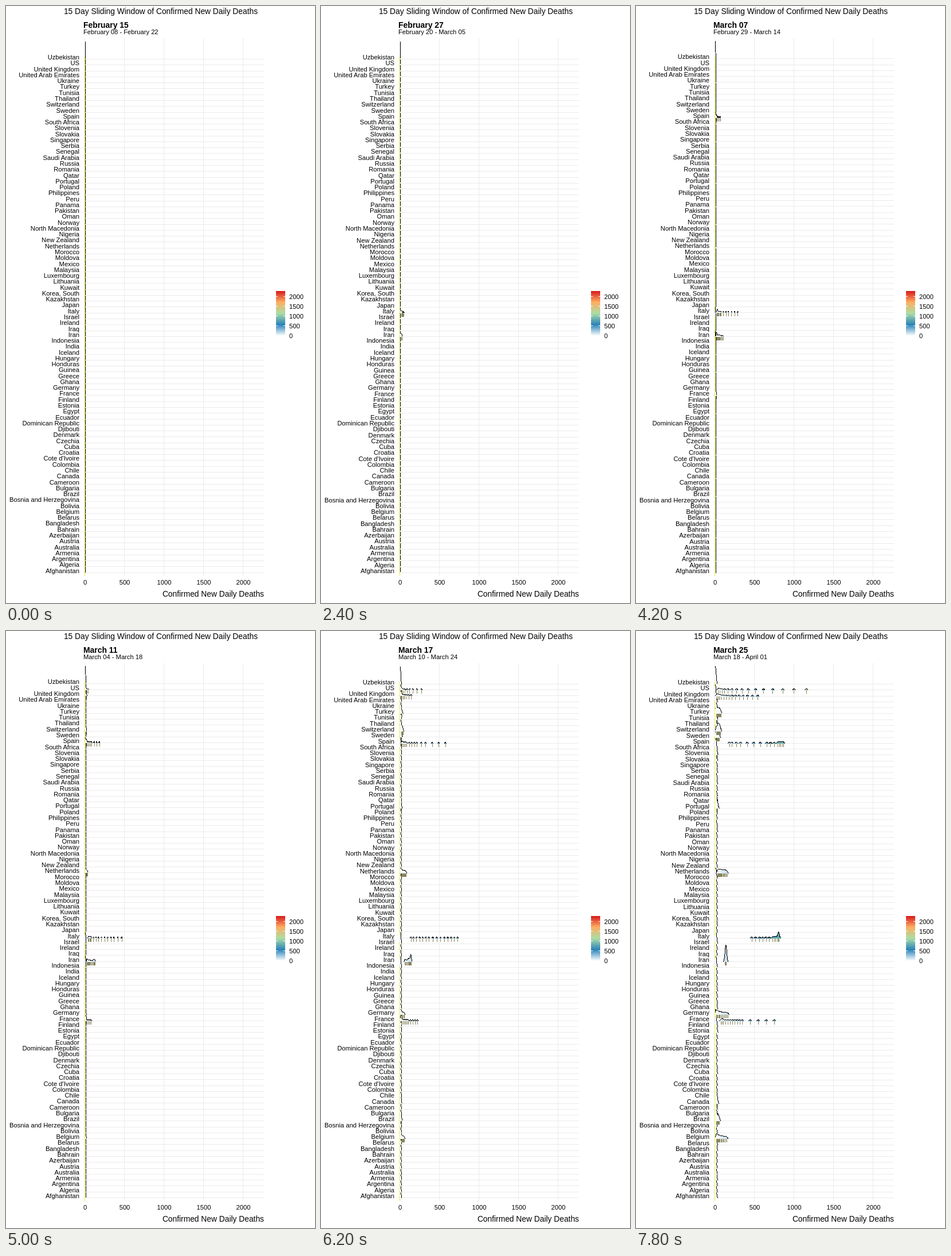
Animation, 539 px wide and 1039 px high, one loop 8 s. Source, as an HTML page:

```html
<!DOCTYPE html>
<html lang="en">
<head>
<meta charset="utf-8">
<title>Sliding window ridgelines</title>
<style>
html, body { margin: 0; width: 100%; height: 100%; overflow: hidden; background: #fff; }
svg { display: block; font-family: "Liberation Sans", Arial, sans-serif; font-size: 11.2px; }
.big { font-size: 13.8px; }
.bold { font-size: 13.9px; font-weight: bold; }
.end { text-anchor: end; }
.mid { text-anchor: middle; }
.crisp { shape-rendering: crispEdges; fill: none; stroke-width: 1; }
</style>
</head>
<body>
<svg id="stage" width="539" height="1039" viewBox="0 0 539 1039"></svg>
<script>
const STEP = 200, FRAMES = 40, HALF = 7, LAST = FRAMES - 1 + HALF;
const X0 = 138, LEFT = 135, RIGHT = 450, PEAK = 31;
const MONTHS = ['January', 'February', 'March', 'April'];
const SHADES = ['#8a8456', '#9a8868', '#74845c'];
const RAMP = ['#ffffff', '#2b83ba', '#abdda4', '#fdae61', '#d7191c'];

const names = `Uzbekistan,US,United Kingdom,United Arab Emirates,Ukraine,Turkey,Tunisia,Thailand,Switzerland,Sweden,
Spain,South Africa,Slovenia,Slovakia,Singapore,Serbia,Senegal,Saudi Arabia,Russia,Romania,Qatar,Portugal,Poland,
Philippines,Peru,Panama,Pakistan,Oman,Norway,North Macedonia,Nigeria,New Zealand,Netherlands,Morocco,Moldova,Mexico,
Malaysia,Luxembourg,Lithuania,Kuwait,Korea; South,Kazakhstan,Japan,Italy,Israel,Ireland,Iraq,Iran,Indonesia,India,
Iceland,Hungary,Honduras,Guinea,Greece,Ghana,Germany,France,Finland,Estonia,Egypt,Ecuador,Dominican Republic,Djibouti,
Denmark,Czechia,Cuba,Croatia,Cote d'Ivoire,Colombia,Chile,Canada,Cameroon,Bulgaria,Brazil,Bosnia and Herzegovina,
Bolivia,Belgium,Belarus,Bangladesh,Bahrain,Azerbaijan,Austria,Australia,Armenia,Argentina,Algeria,Afghanistan`
  .split(/,\s*/).map(s => s.replace(';', ','));

// Power curves: pixel offset on the last day, first day, exponent
const growth = {
  'US': [159, 26, 2.85], 'United Kingdom': [74, 28, 2.3],
  'Germany': [22, 29, 1.8], 'Netherlands': [20.5, 26, 1.4], 'Belgium': [20, 28, 1.8],
  'Switzerland': [9, 27, 1.2], 'Turkey': [9.5, 32, 1.2], 'Sweden': [7, 30, 1.5],
  'Brazil': [7, 31, 1.5], 'Portugal': [4, 30, 1.2], 'Canada': [3.5, 32, 1.2]
};

// Uneven curves: day and pixel offset at each bend
const bends = {
  'Italy': [[8, 0], [17, 4], [22, 10], [25, 23], [30, 50], [34, 77], [38, 100], [42, 110], [46, 111]],
  'Spain': [[20, 0], [25, 3], [29, 11], [33, 29], [35, 44], [39, 90], [42, 109], [46, 119]],
  'Iran': [[10, 0], [19, 3], [25, 9], [28, 13.5], [34, 18.5], [46, 19]],
  'France': [[22, 0], [28, 2], [34, 14], [38, 30], [42, 47], [46, 103]]
};

const clamp = (v, lo = 0, hi = 1) => Math.min(hi, Math.max(lo, v));

function random(seed) {
  const v = Math.sin(seed * 91.7 + 3) * 4375.5;
  return v - Math.floor(v);
}

function along(points, day) {
  if (day <= points[0][0]) return points[0][1];
  const i = points.findIndex(p => p[0] >= day);
  const [d0, v0] = points[i - 1], [d1, v1] = points[i];
  return v0 + (v1 - v0) * (day - d0) / (d1 - d0);
}

function value(name, index, day) {
  if (bends[name]) return along(bends[name], day);
  const [end, from, power] = growth[name] || [.2 + 2 * random(index) ** 4, 30, 1];
  return end * clamp((day - from) / (LAST - from)) ** power;
}

const stage = document.getElementById('stage');
function add(tag, attrs, text) {
  const el = document.createElementNS('http://www.w3.org/2000/svg', tag);
  for (const key in attrs) el.setAttribute(key, attrs[key]);
  if (text !== undefined) el.textContent = text;
  stage.appendChild(el);
  return el;
}
const label = (x, y, text, cls = '') => add('text', { x, y, class: cls }, text);
const line = (d, stroke) => add('path', { d, stroke, class: 'crisp' });

function gradient(id, x1, y1, x2, y2) {
  const el = add('linearGradient', { id, gradientUnits: 'userSpaceOnUse', x1, y1, x2, y2 });
  RAMP.forEach((color, i) => el.appendChild(
    add('stop', { offset: i / (RAMP.length - 1), 'stop-color': color })));
}

gradient('heat', X0, 0, 448, 0);
gradient('key', 0, 574, 0, 496);

label(270, 14, '15 Day Sliding Window of Confirmed New Daily Deaths', 'big mid');
const heading = label(LEFT, 38, '', 'bold');
const range = label(LEFT, 49, '');
label(RIGHT, 1028, 'Confirmed New Daily Deaths', 'big end');

for (let i = 0; i < 5; i++) {
  const x = X0 + i * 69;
  line(`M${x - .5} 56V992`, '#ebebeb');
  label(x, 1007, i * 500, 'mid');
}

// Upper rows lie over lower ones, so the rows are stacked from the bottom.
const grid = names.map(() => line('', '#ebebeb'));
const rows = names.map((name, index) => ({ name, index })).reverse();
for (const row of rows) {
  row.fill = add('path', { fill: 'url(#heat)' });
  row.edge = line('', '#000');
  row.zero = line('', '#f0f030');
  row.ticks = SHADES.map(c => line('', c));
}
const labels = names.map(name => label(128, 0, name, 'end'));

add('rect', { x: 471, y: 496, width: 16, height: 78, fill: 'url(#key)' });
for (let i = 0; i < 5; i++) {
  const y = 573.5 - i * 17;
  line(`M471 ${y}h3M484 ${y}h3`, '#fff');
  label(494, y + 4.5, i * 500);
}

function ridge(values, base, width) {
  const end = Math.max(...values) + 4 * width;
  let fill = '', edge = '', open = false, last = 0;
  for (let x = 0; x <= end + .5; x += .25) {
    let sum = 0;
    for (const v of values) sum += Math.exp(-(((x - v) / width) ** 2) / 2);
    const density = sum / values.length;
    if (density > .008) {
      const p = `${X0 + x + .25} ${(base - PEAK * density ** .9).toFixed(2)}`;
      if (!open) fill += `M${X0 + x} ${base}`;
      edge += (open ? 'L' : 'M') + p;
      fill += 'L' + p;
      open = true;
      last = x;
    } else if (open) {
      fill += `L${X0 + last + .25} ${base}Z`;
      open = false;
    }
  }
  return [fill, edge];
}

function dayText(offset) {
  const d = new Date(Date.UTC(2020, 1, 15 + offset));
  return MONTHS[d.getUTCMonth()] + ' ' + String(d.getUTCDate()).padStart(2, '0');
}

function draw(k) {
  heading.textContent = dayText(k);
  range.textContent = dayText(k - HALF) + ' - ' + dayText(k + HALF);

  const lift = .8 * clamp((k - 16) / 4) * clamp((39 - k) / 18);
  const top = 93.1 - lift, bottom = 986.6 + Math.min(.4, k / 60);
  const width = .25 + 1.1 * (k / 39) ** 2.5;

  for (const row of rows) {
    const i = row.index;
    const base = Math.round(top + (bottom - top) * i / (names.length - 1));
    const values = [];
    for (let n = k - HALF; n <= k + HALF; n++) values.push(value(row.name, i, n));

    grid[i].setAttribute('d', `M${LEFT} ${base - .5}H${RIGHT}`);
    labels[i].setAttribute('y', base);

    const [fill, edge] = ridge(values, base, width);
    row.fill.setAttribute('d', fill);
    row.edge.setAttribute('d', edge);
    row.zero.setAttribute('d', values.some(v => v < 1.5) ? `M${X0 - .5} ${base - 4}v9` : '');

    const marks = SHADES.map(() => '');
    values.forEach((v, j) => {
      if (v >= 1.5) marks[(j + k) % SHADES.length] += `M${Math.round(X0 + v) + .5} ${base}v6`;
    });
    row.ticks.forEach((el, j) => el.setAttribute('d', marks[j]));
  }
}

const start = performance.now();
let shown = -1;
function tick() {
  const k = Math.floor((performance.now() - start) / STEP) % FRAMES;
  if (k !== shown) draw(shown = k);
  requestAnimationFrame(tick);
}
tick();
</script>
</body>
</html>
```
